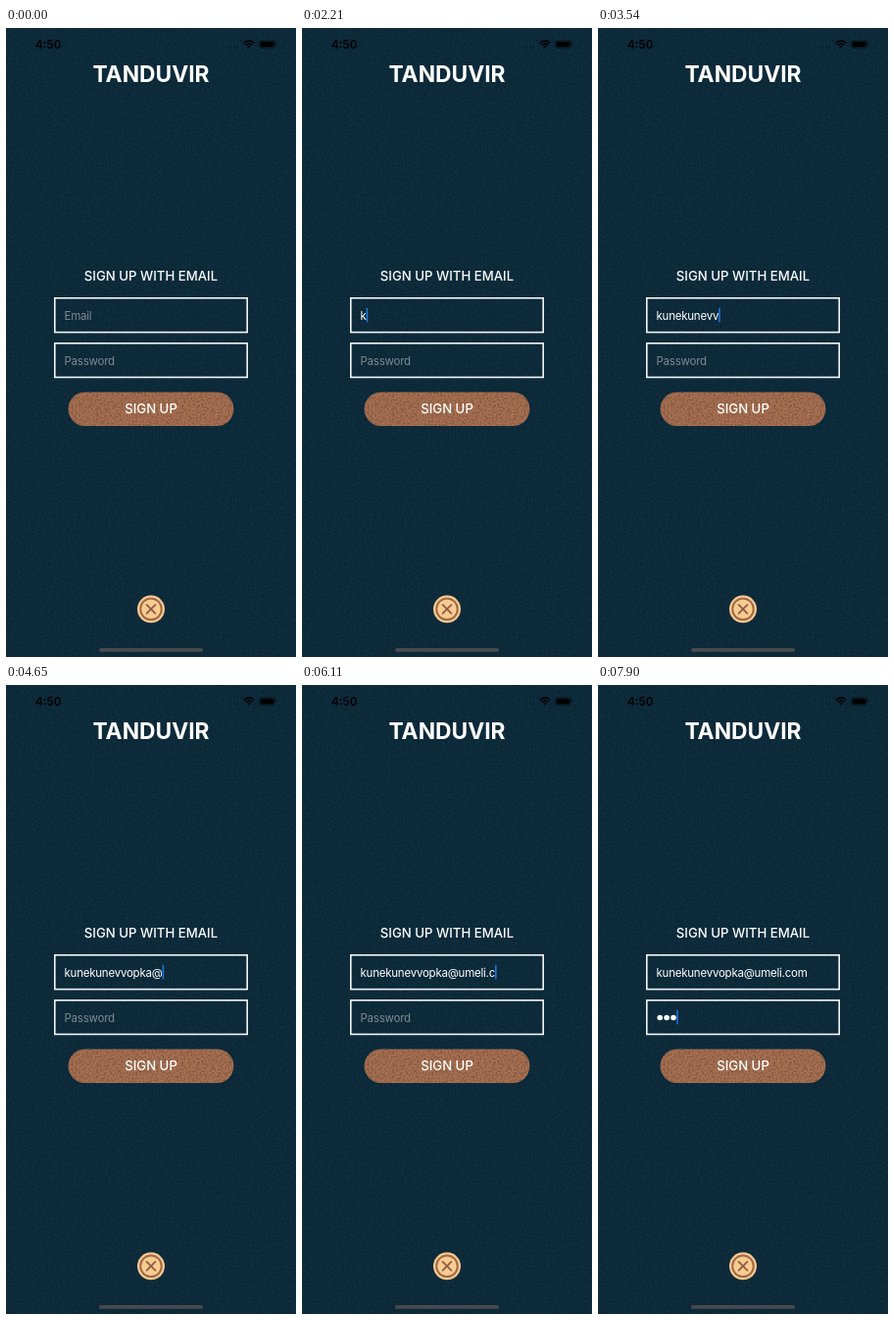
These frames come from a looping animation (296 by 640 pixels, 8 s). An HTML page:

```html
<!DOCTYPE html>
<html lang="en">
<head>
<meta charset="utf-8">
<title>Sign up</title>
<style>
  html, body { margin: 0; height: 100%; overflow: hidden; background: #0e2e3f; }
  svg { display: block; width: 296px; height: 640px; font-family: Inter, sans-serif; fill: #fff; }
  .mid { text-anchor: middle; }
  .label { font-size: 13.2px; font-weight: 500; }
  .input { font-size: 11.5px; letter-spacing: -.02em; }
  .hint { fill: #7e8a91; }
  .box { fill: none; stroke: #f4f6f7; stroke-width: 1.6; }
</style>
</head>
<body>
<svg viewBox="0 0 296 640">
  <defs>
    <filter id="grain" x="0" y="0" width="100%" height="100%" color-interpolation-filters="sRGB">
      <feTurbulence type="fractalNoise" baseFrequency=".55" numOctaves="2" seed="4"/>
      <feColorMatrix values="0 0 0 0 0  0 0 0 0 0  0 0 0 0 0  .7 0 0 0 -.28"/>
    </filter>
  </defs>

  <rect width="296" height="640" fill="#0e2e3f"/>
  <rect x="63.5" y="370.5" width="169" height="34.5" rx="17.25" fill="#a97152"/>
  <rect width="296" height="640" filter="url(#grain)"/>

  <!-- status bar -->
  <g fill="#000">
    <text x="30" y="21" font-size="11.7" font-weight="600">4:50</text>
    <g opacity=".3">
      <circle cx="227" cy="19.5" r=".8"/><circle cx="230" cy="19.5" r=".8"/>
      <circle cx="233" cy="19.5" r=".8"/><circle cx="236" cy="19.5" r=".8"/>
    </g>
    <g fill="none" stroke="#000" stroke-width="1.7">
      <path d="M242.8 15.3a7.4 7.4 0 0 1 10.4 0M244.7 17.4a4.7 4.7 0 0 1 6.6 0"/>
    </g>
    <path d="M248 20.6l-1.8-1.9a2.6 2.6 0 0 1 3.6 0z"/>
    <rect x="258.4" y="12.7" width="16.2" height="7.8" rx="2.3" fill="none" stroke="#000" stroke-width=".8" opacity=".45"/>
    <rect x="259.5" y="13.8" width="14" height="5.6" rx="1.4"/>
    <rect x="275.3" y="15.2" width="1" height="2.8" rx=".5" opacity=".5"/>
  </g>

  <text class="mid" x="148" y="55" font-size="22.8" font-weight="700">TANDUVIR</text>
  <text class="mid label" x="148" y="257">SIGN UP WITH EMAIL</text>
  <rect class="box" x="49.8" y="274.8" width="196.4" height="34.8"/>
  <rect class="box" x="49.8" y="320.8" width="196.4" height="34.6"/>
  <text id="email" class="input" x="59.5" y="296.8"></text>
  <text id="hint" class="input hint" x="59.5" y="342.8">Password</text>
  <g id="dots">
    <circle cx="63.2" cy="338.5" r="2.8"/>
    <circle cx="70.1" cy="338.5" r="2.8"/>
    <circle cx="77" cy="338.5" r="2.8"/>
  </g>
  <rect id="caret" width="1.5" height="14.5" fill="#2377e8"/>
  <text class="mid label" x="148" y="392.3">SIGN UP</text>

  <!-- close button -->
  <circle cx="148" cy="591.3" r="14" fill="#f8cb90"/>
  <circle cx="148" cy="591.3" r="10.8" fill="none" stroke="#a06a48" stroke-width="2"/>
  <path d="M143.6 586.9l8.8 8.8m0-8.8l-8.8 8.8" stroke="#8f6044" stroke-width="1.9" stroke-linecap="round"/>

  <rect x="95" y="631" width="106" height="3.8" rx="1.9" fill="#484b4d"/>
</svg>
<script>
  const LOOP = 8000;
  const address = 'kunekunevvopka@umeli.com';
  const keyTimes = [
    2050, 2240, 2430, 2620, 2750,
    2860, 3030, 3200, 3370, 3540,
    3800, 3930, 4070, 4200,
    4650, 4870, 5070, 5270, 5470, 5680,
    5890, 6110, 6290, 6490
  ];
  const dotTimes = [7670, 7670, 7900];
  const focusEmail = 1610, blurEmail = 7230, focusPassword = 7370;

  const $ = id => document.getElementById(id);
  const email = $('email'), hint = $('hint'), dots = $('dots'), caret = $('caret');
  const countPast = (times, t) => times.filter(at => at <= t).length;
  const show = (el, on) => el.setAttribute('visibility', on ? 'visible' : 'hidden');

  function draw(t) {
    const typed = countPast(keyTimes, t);
    const hidden = countPast(dotTimes, t);
    const inPassword = t >= focusPassword;

    email.textContent = typed ? address.slice(0, typed) : 'Email';
    email.classList.toggle('hint', !typed);
    show(hint, !hidden);
    [...dots.children].forEach((dot, i) => show(dot, i < hidden));

    const width = inPassword ? hidden * 6.9 : typed ? email.getComputedTextLength() : 0;
    caret.setAttribute('x', 59.6 + width);
    caret.setAttribute('y', inPassword ? 330.8 : 284.8);
    show(caret, inPassword || (t >= focusEmail && t < blurEmail));
  }

  const start = performance.now();
  function tick() {
    draw((performance.now() - start) % LOOP);
    requestAnimationFrame(tick);
  }
  tick();
</script>
</body>
</html>
```
